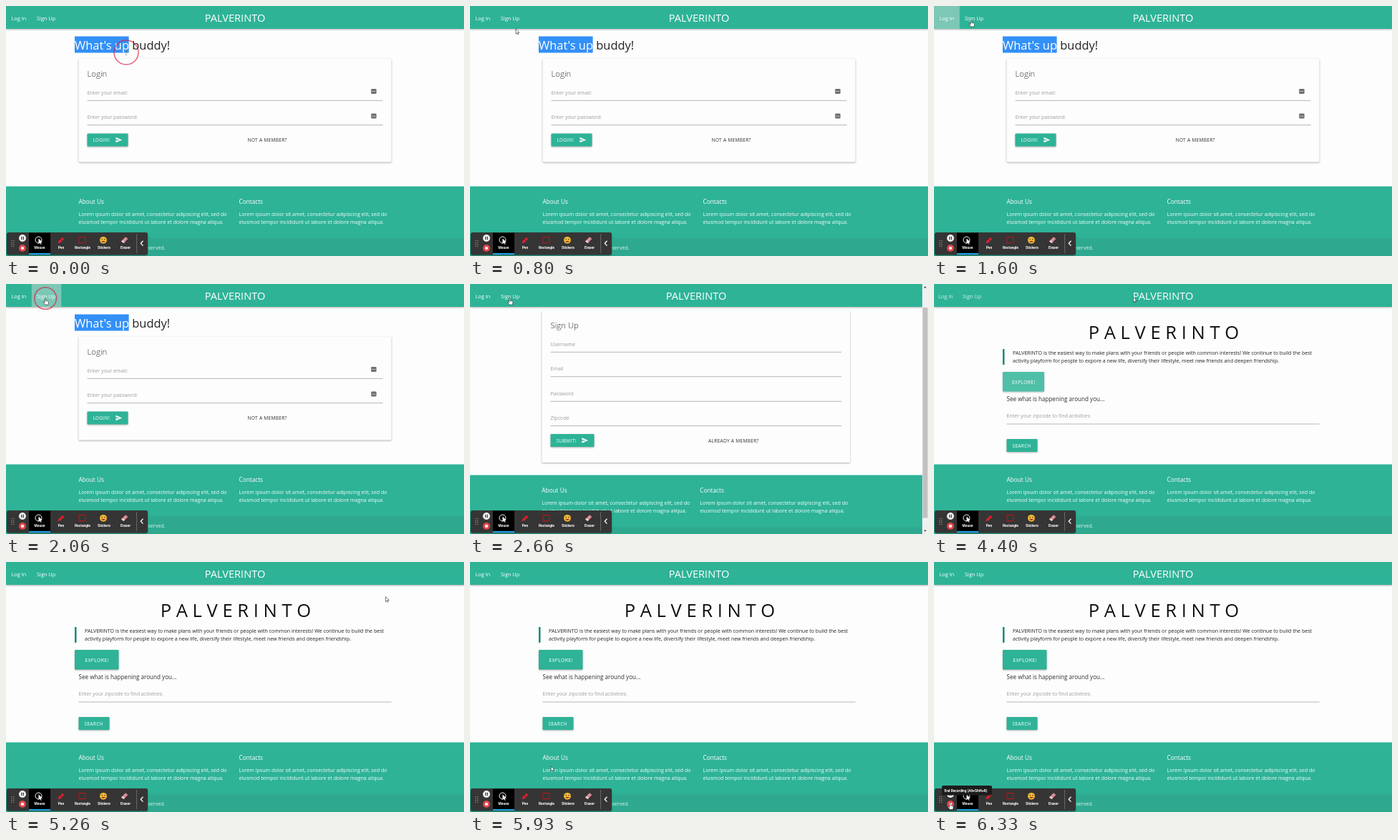
An HTML page that plays this animation: 640x350 px, repeating every 6400 ms.

```html
<!DOCTYPE html>
<html lang="en">
<head>
<meta charset="utf-8">
<title>Activity planner walkthrough</title>
<style>
  html, body { margin: 0; width: 100%; height: 100%; overflow: hidden; background: #fdfdfd; }
  svg { display: block; width: 640px; height: 350px; }
  text { font-family: "Open Sans", "Noto Sans", sans-serif; white-space: pre; }
  .bar text { font-family: Roboto, "Liberation Sans", sans-serif; font-weight: 700; }
  .raised { filter: drop-shadow(0 1px 1px rgba(0, 0, 0, .32)); }
</style>
</head>
<body>
<svg id="stage" viewBox="0 0 640 350"></svg>
<script>
const LOOP = 6400, STEP = LOOP / 96;
const TEAL = '#2eb397', INK = '#303030', GREY = '#9b9b9b';
const BRAND = 'PALVERINTO';
const SIGNUP_AT = 2260, ICONS_AT = 2920, HOME_AT = 4260;

// Markup helpers
const text = (x, y, s, size = 7.12, fill = INK, more = '') =>
  `<text x="${x}" y="${y}" font-size="${size}" fill="${fill}" ${more}>${s}</text>`;
const rect = (x, y, w, h, fill, more = '') =>
  `<rect x="${x}" y="${y}" width="${w}" height="${h}" fill="${fill}" ${more}/>`;
const path = (d, fill, more = '') => `<path d="${d}" fill="${fill}" ${more}/>`;
const circle = (x, y, r, fill, more = '') =>
  `<circle cx="${x}" cy="${y}" r="${r}" fill="${fill}" ${more}/>`;
const group = (id, body, more = '') => `<g id="${id}" ${more}>${body}</g>`;
const MIDDLE = 'text-anchor="middle"', CAPS = 'letter-spacing=".25"';

const card = (x, y, w, h) => rect(x, y, w, h, '#fdfdfd', 'rx="1" class="raised"');
const field = (x, y, w, label) =>
  text(x, y, label, 7.12, GREY) + rect(x, y + 8.3, w, .8, '#a6a6a6');
const button = (x, y, w, label) =>
  rect(x, y, w, 18, TEAL, 'rx="1" class="raised"') + text(x + 8, y + 11.9, label, 6.65, '#fff', CAPS);
const send = (x, y) =>
  path('M2 21L23 12 2 3v7l15 2-15 2z', '#fff', `transform="translate(${x} ${y}) scale(.42)"`);
const fillIcon = (x, y) =>
  rect(x, y, 7.4, 7, '#707070', 'rx="1"') + rect(x + 1, y + 3.3, 5.4, .7, '#d5d5d5');
const pinIcon = (x, y) =>
  circle(x, y, 3.2, 'none', 'stroke="#777" stroke-width=".9"') + circle(x, y - .5, 1.2, '#666') +
  rect(x - .5, y, 1, 4.4, '#666');

function footer(y, left, right) {
  const column = (x, title) =>
    text(x, y + 24, title, 8.25, '#fff') +
    text(x, y + 41.5, 'Lorem ipsum dolor sit amet, consectetur adipiscing elit, sed do', 7.12, '#f5fffc') +
    text(x, y + 52.3, 'eiusmod tempor incididunt ut labore et dolore magna aliqua.', 7.12, '#f5fffc');
  return rect(0, y, 640, 350 - y, TEAL) + rect(0, y + 72.8, 640, 30, '#333', 'opacity=".08"') +
    column(left, 'About Us') + column(right, 'Contacts') +
    text(222.5, y + 88, 'All rights reserved.', 7.12, '#d9f2ec', 'text-anchor="end"');
}

const loginPage =
  rect(96, 42.5, 75.6, 23, '#3390f7') +
  text(96, 60.6, '<tspan fill="#fff">What\'s up</tspan> buddy!', 16.45, '#222') +
  card(101.5, 73.5, 437, 145) +
  text(113.5, 98.5, 'Login', 11.4, INK, 'font-weight="300"') +
  field(113.5, 123.6, 413, 'Enter your email:') + fillIcon(510.2, 116) +
  field(113.5, 158, 413, 'Enter your password:') + fillIcon(510.2, 150.6) +
  button(113.5, 178.5, 57, 'LOGIN!') + send(152.6, 182.4) +
  text(337.5, 190.4, 'NOT A MEMBER?', 6.65, INK, CAPS) +
  footer(252.5, 101.5, 325.5);

const signupPage =
  card(100.5, 37, 430.5, 213) +
  text(112.5, 62, 'Sign Up', 11.4, INK, 'font-weight="300"') +
  ['Username', 'Email', 'Password', 'Zipcode']
    .map((label, i) => field(112.5, 86.6 + 34.45 * i, 406.5, label)).join('') +
  group('icons', fillIcon(502.8, 79.5) + pinIcon(507, 152.5)) +
  button(112.5, 210, 61, 'SUBMIT!') + send(155.6, 213.9) +
  text(333, 221.9, 'ALREADY A MEMBER?', 6.65, INK, CAPS) +
  footer(267.5, 100.3, 321.3) +
  rect(632, 0, 8, 350, '#f1f1f1') + rect(632.5, 8.5, 7, 319, '#c1c1c1') +
  path('M634 5.5l2-2.5 2 2.5z', '#555') + path('M634 344.5l2 2.5 2-2.5z', '#555');

const homePage =
  text(321, 76.6, [...BRAND].join(' '), 25.6, '#111', MIDDLE) +
  rect(96, 91, 2.5, 22, '#178a78') +
  text(110, 99.3, BRAND + ' is the easiest way to make plans with your friends or people with common interests! We continue to build the best', 7.08, '#222') +
  text(110, 110.2, 'activity playform for people to expore a new life, diversify their lifestyle, meet new friends and deepen friendship.', 7.08, '#222') +
  group('explore', rect(96, 123, 61.5, 27.5, TEAL, 'id="exploreBox" rx="1" class="raised"') +
    text(127, 139.5, 'EXPLORE!', 7, '#fff', CAPS + ' id="exploreText" ' + MIDDLE)) +
  text(101.5, 163.8, 'See what is happening around you...', 8.12) +
  field(101.5, 187.3, 437, 'Enter your zipcode to find activities:') +
  button(101.5, 217, 43, 'SEARCH') +
  footer(252.5, 101.5, 325.5);

const nav =
  rect(0, 0, 640, 32, TEAL, 'id="navBox" class="raised"') +
  rect(0, 0, 35.8, 32, '#c9dcd6', 'id="logHover"') +
  rect(35.8, 0, 41.5, 32, '#c9dcd6', 'id="signHover"') +
  group('links', text(7.5, 19.6, 'Log In', 7.35, '#fff', 'id="logIn"') +
    text(43, 19.6, 'Sign Up', 7.35, '#fff', 'id="signUp"')) +
  text(320, 22.4, BRAND, 14.6, '#fff', 'id="brand" ' + MIDDLE);

function toolbar() {
  const tools = ['Mouse', 'Pen', 'Rectangle', 'Stickers', 'Eraser'];
  const dots = [0, 1, 2, 3].map(i =>
    circle(8, 328.5 + 2.6 * i, .6, '#bbb') + circle(10.8, 328.5 + 2.6 * i, .6, '#bbb')).join('');
  return rect(1, 317, 197, 31.5, '#353535', 'rx="2.5" class="raised"') + dots +
    circle(23, 325, 5, '#f2f2f2') + rect(21.2, 322.8, 1.2, 4.4, '#333') + rect(23.7, 322.8, 1.2, 4.4, '#333') +
    circle(23, 339, 5, '#e0464e') + rect(21.2, 337.2, 3.6, 3.6, '#fff') +
    rect(32, 317.5, 30, 29, '#000') + rect(32, 346, 30, 2, '#1fa3ec') +
    circle(45.5, 327.5, 4.5, 'none', 'stroke="#fff" stroke-width="1"') +
    path('M45.5 325.5v7.5l1.8-1.7 1.2 2.5 1.2-.6-1.2-2.4h2.3z', '#fff') +
    path('M72.5 332l1-3 5.2-5.2 2.4 2.4-5.2 5.2z', '#d8232f') +
    path('M76 326.3l2.4 2.4', 'none', 'stroke="#7d1118"') +
    rect(102, 323.5, 9, 8, 'none', 'stroke="#b3161f" stroke-width="1.1"') +
    circle(136, 327.8, 4.9, '#f3bd32') + circle(134.3, 326.6, .8, '#5b3a10') + circle(137.8, 326.6, .8, '#5b3a10') +
    path('M133.3 329a2.8 2.8 0 0 0 5.4 0z', '#a8322a') +
    path('M161 329.5l6-6.2 3.4 2.6-6 6.2z', '#d98d96') + path('M161 329.5l1.8-1.8 3.4 2.6-1.8 1.8z', '#f0c9cd') +
    tools.map((s, i) => text(47 + 30 * i, 340.3, s, 4.9, '#fff', MIDDLE)).join('') +
    rect(182.3, 319, .8, 27, '#777') +
    path('M191.5 328.8l-3.2 3.4 3.2 3.4', 'none', 'stroke="#fff" stroke-width="1.3"') +
    group('tip', rect(11, 313, 70, 13.5, '#1c1c1c', 'rx="2"') +
      text(14.5, 321.6, 'End Recording (Alt+Shift+R)', 4.75, '#fff'));
}

const OUTLINE = 'stroke="#222" stroke-width=".6" stroke-linejoin="round"';
const pointers =
  group('arrow', path('M0 0v7l1.6-1.5 1.1 2.3 1-.5-1-2.2h2.2z', '#fff', OUTLINE)) +
  group('hand', path('M-.8 .4q.8-.9 1.5 0v3l3 .7q1 .4.8 1.6l-.6 3.3h-4.3l-2.7-3.6q.3-1 1.4-.2l.9.8z', '#fff', OUTLINE)) +
  group('beam', path('M-1.4-3.5h2.8M0-3.5v7M-1.4 3.5h2.8', 'none', 'stroke="#888" stroke-width=".6"'));

const stage = document.getElementById('stage');
stage.innerHTML = rect(0, 0, 640, 350, '#fdfdfd') +
  group('login', loginPage) + group('signup', signupPage) + group('home', homePage) +
  nav + rect(632, 0, 8, 33, '#f1f1f1', 'id="barTop"') +
  path('M634 5.5l2-2.5 2 2.5z', '#555', 'id="barTopArrow"') +
  group('tools', toolbar(), 'class="bar"') +
  circle(0, 0, 17, 'none', 'id="ring" stroke="#d51f3c" stroke-width="1.5"') + pointers;

const el = id => document.getElementById(id);
const set = (id, attrs) => { for (const k in attrs) el(id).setAttribute(k, attrs[k]); };
const show = (id, on) => set(id, { visibility: on ? 'visible' : 'hidden' });
const ramp = (t, a, b) => Math.min(1, Math.max(0, (t - a) / (b - a)));
const smooth = p => p * p * (3 - 2 * p);
const mix = (a, b, p) => a + (b - a) * p;

// Pointer stops: time, x, y
const route = [
  [0, 168, 65], [330, 168, 65], [1070, 19, 18], [1330, 22, 19], [1600, 52, 20], [1800, 55, 20],
  [2730, 55.5, 20], [3500, 279, 16], [4400, 278.5, 18.5], [4660, 279, 20], [5260, 530.5, 48.5],
  [5400, 530.5, 48.5], [6130, 22.5, 337.5], [LOOP, 22.5, 337.5]
];
// Clicks: start, end, first radius, last radius
const clicks = [[-400, 190, 17, 17], [1860, 2130, 10, 17], [3590, 3930, 11, 18]];

function pointerAt(t) {
  const i = Math.max(1, route.findIndex(s => s[0] >= t));
  const [t0, x0, y0] = route[i - 1], [t1, x1, y1] = route[i];
  const p = smooth(ramp(t, t0, t1));
  return [mix(x0, x1, p), mix(y0, y1, p)];
}

function draw(t) {
  const page = t < SIGNUP_AT ? 'login' : t < HOME_AT ? 'signup' : 'home';
  for (const id of ['login', 'signup', 'home'])
    set(id, { display: id === page ? 'inline' : 'none' });
  const scrolls = page === 'signup';
  show('icons', scrolls && t >= ICONS_AT);
  show('barTop', scrolls);
  show('barTopArrow', scrolls);
  set('navBox', { width: scrolls ? 632 : 640 });
  set('brand', { x: scrolls ? 316 : 320 });

  // Links and the large button settle after each page load
  const loaded = page === 'login' ? -1000 : scrolls ? SIGNUP_AT : HOME_AT;
  const k = ramp(t, loaded, loaded + 320);
  set('logIn', { x: mix(4.9, 7.5, k) });
  set('signUp', { x: mix(37.7, 43, k) });
  set('links', { opacity: mix(.65, 1, k) });
  const w = mix(55.4, 61.5, k);
  set('exploreBox', { width: w });
  set('exploreText', { x: 96.2 + w / 2, 'font-size': mix(6.8, 7, k) });
  set('explore', { opacity: mix(.7, 1, k) });

  const first = page === 'login';
  set('logHover', { opacity: first ? .5 * ramp(t, 1000, 1270) * (1 - ramp(t, 1600, 1870)) : 0 });
  set('signHover', { opacity: first ? .5 * ramp(t, 1600, 1870) : 0 });

  const [x, y] = pointerAt(t);
  const overLink = (t > 1000 && t < 2800) || (t > 3360 && t < HOME_AT) || t > 6050;
  const kind = overLink ? 'hand' : t < 400 ? 'beam' : 'arrow';
  for (const id of ['arrow', 'hand', 'beam']) {
    show(id, id === kind);
    set(id, { transform: `translate(${x} ${y})` });
  }

  const click = clicks.find(c => t >= c[0] && t < c[1]);
  show('ring', click);
  if (click) {
    const p = ramp(t, click[0], click[1]);
    set('ring', { cx: x, cy: y, r: mix(click[2], click[3], p), opacity: .68 });
  }
  show('tip', t >= 6180);
}

const start = performance.now();
function tick(now) {
  const t = Math.max(0, now - start) % LOOP;
  draw(Math.floor((t + 7) / STEP) % 96 * STEP);
  requestAnimationFrame(tick);
}
draw(0);
requestAnimationFrame(tick);
</script>
</body>
</html>
```
